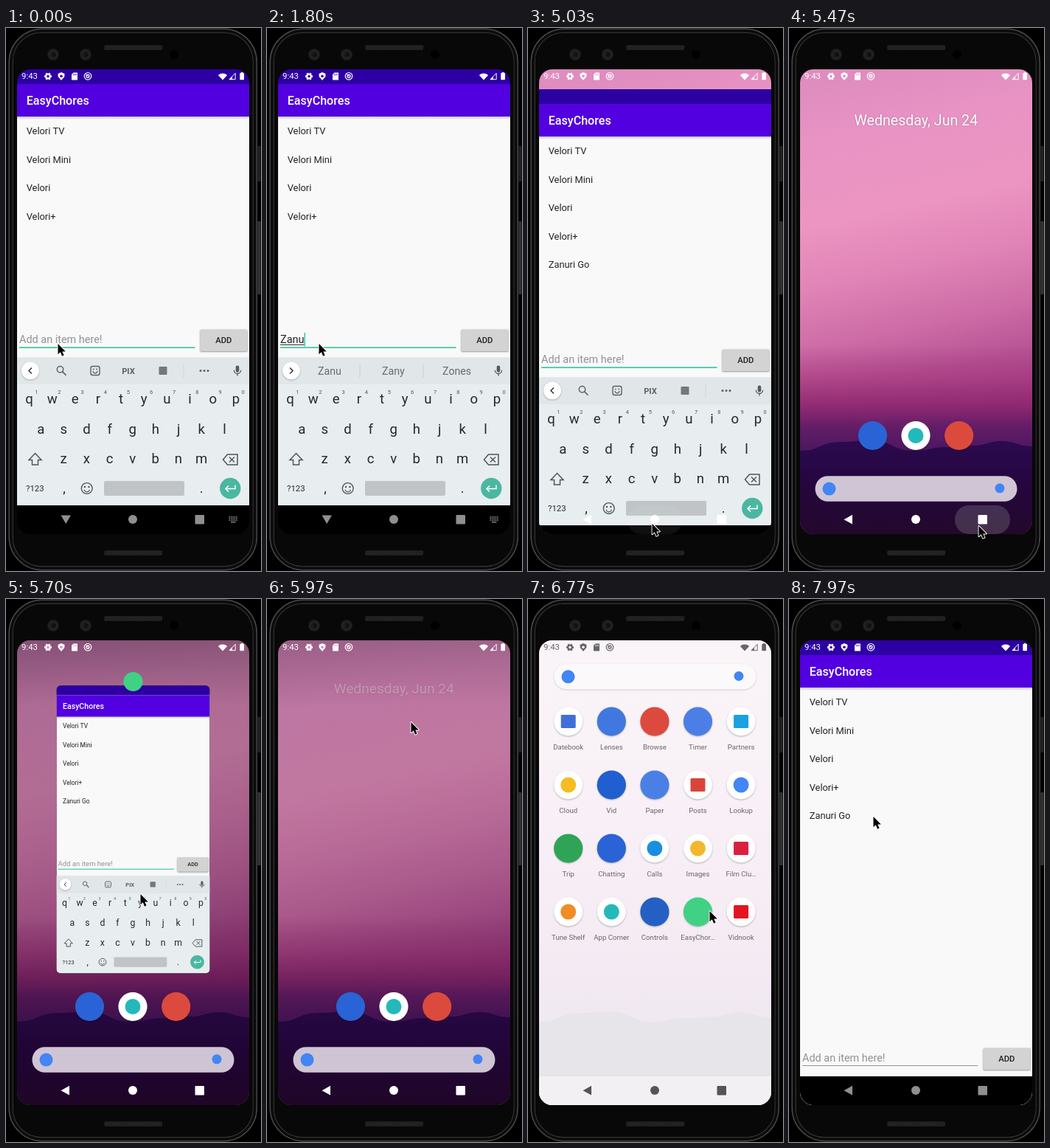
Animation, 346 px wide and 736 px high, one loop 8000 ms. Source, as an HTML page with a canvas:

```html
<!DOCTYPE html>
<html lang="en">
<head>
<meta charset="utf-8">
<title>Chore list</title>
<style>
html, body { margin: 0; width: 100%; height: 100%; overflow: hidden; background: #000; }
canvas { display: block; width: 346px; height: 736px; }
</style>
</head>
<body>
<canvas id="stage"></canvas>
<script>
const W = 346, H = 736, LOOP = 8000;
const canvas = document.getElementById('stage');
const dpr = window.devicePixelRatio || 1;
canvas.width = W * dpr;
canvas.height = H * dpr;
const c = canvas.getContext('2d');

const SCREEN = { x: 15, y: 56, w: 315, h: 630, r: 18 };
const TEAL = '#35c9a5', BLUE = '#2a63d6';
const ITEMS = ['Velori TV', 'Velori Mini', 'Velori', 'Velori+', 'Zanuri Go'];
const APP = 'EasyChores';

const KEY_TIMES = [450, 1050, 1450, 1800, 2050, 2250, 2600, 2850, 3150];
const ADD = 4050;
const HINTS = [
  ['Z', 'Zoo', 'Zone'], ['Za', 'Zap', 'Zone'], ['Zan', 'Zany', 'Zone'],
  ['Zanu', 'Zany', 'Zones'], ['Zanur', 'Zany', 'Zones'], ['Zanuri', 'Zany', 'Zones'],
  ['is', 'and', 'the'], ['G', 'Get', 'Give'], ['Go', 'Good', 'Going']
];

// time, x, y of the pointer tip
const POINTER = [
  [0, 70, 428], [3450, 70, 428], [3850, 291, 418], [4180, 291, 418],
  [4600, 205, 724], [4930, 168, 672], [5080, 168, 672], [5350, 257, 675],
  [5570, 257, 675], [5690, 182, 400], [5740, 182, 400], [5880, 194, 175],
  [5970, 195, 167], [6080, 195, 170], [6240, 200, 520], [6440, 206, 250],
  [6700, 246, 423], [7420, 246, 423], [7800, 114, 295], [8000, 114, 295]
];

const clamp = v => Math.max(0, Math.min(1, v));
const ramp = (t, a, b) => clamp((t - a) / (b - a));
const ease = p => p * p * (3 - 2 * p);
const out = p => 1 - (1 - p) ** 3;
const mix = (a, b, p) => a + (b - a) * p;

function rect(x, y, w, h, color) { c.fillStyle = color; c.fillRect(x, y, w, h); }

function round(x, y, w, h, r, color) {
  c.beginPath(); c.roundRect(x, y, w, h, r);
  c.fillStyle = color; c.fill();
}

function disc(x, y, r, color) {
  c.beginPath(); c.arc(x, y, r, 0, 7);
  c.fillStyle = color; c.fill();
}

function trace(points, close) {
  c.beginPath();
  for (let i = 0; i < points.length; i += 2) c.lineTo(points[i], points[i + 1]);
  if (close) c.closePath();
}

function poly(points, color) { trace(points, true); c.fillStyle = color; c.fill(); }

function line(points, color, width = 1, close = false) {
  trace(points, close);
  c.strokeStyle = color; c.lineWidth = width; c.stroke();
}

function ring(x, y, r, color, width = 1, a = 0, b = 7) {
  c.beginPath(); c.arc(x, y, r, a, b);
  c.strokeStyle = color; c.lineWidth = width; c.stroke();
}

function box(x, y, w, h, r, color, width = 1) {
  c.beginPath(); c.roundRect(x, y, w, h, r);
  c.strokeStyle = color; c.lineWidth = width; c.stroke();
}

function text(s, x, y, size, color, align = 'left', weight = 400) {
  c.font = `${weight} ${size}px Roboto, sans-serif`;
  c.textAlign = align;
  c.fillStyle = color;
  c.fillText(s, x, y);
}

function shadow(blur, dy, alpha, draw) {
  c.save();
  c.shadowColor = `rgba(0,0,0,${alpha})`;
  c.shadowBlur = blur * dpr; c.shadowOffsetY = dy * dpr;
  draw();
  c.restore();
}

function layer(alpha, draw) {
  if (alpha <= 0) return;
  c.save(); c.globalAlpha *= alpha; draw(); c.restore();
}

function gradient(x0, y0, x1, y1, stops) {
  const g = c.createLinearGradient(x0, y0, x1, y1);
  stops.forEach(([p, color]) => g.addColorStop(p, color));
  return g;
}

const vertical = (y0, y1, stops) => gradient(0, y0, 0, y1, stops);

function body() {
  rect(0, 0, W, H, '#000');
  round(340, 160, 5.5, 48, 1, '#222');
  round(340, 262, 5.5, 99, 1, '#333');
  round(3, .5, 338.5, 735, 46, '#0a0a0a');
  box(4.2, 1.2, 336, 733.5, 45, '#484848', 1.5);
  box(6.8, 3.8, 330.8, 728.4, 42, '#0c0c0c', 3);
  box(9.3, 6.3, 325.8, 723.4, 39, '#343434', 1.2);
  round(10, 7, 324.4, 722, 38, '#080808');
  for (const y of [23, 708]) {
    round(133, y, 79, 7, 2, '#1d1d1d');
    for (let x = 135; x < 211; x += 3) line([x, y + 6, x + 2, y + 1], '#303030', .8);
  }
  for (const x of [64, 108]) {
    disc(x, 36, 8, '#1b1b1b');
    ring(x, 36, 5.5, '#2b2b2b');
    disc(x + 1, 36, 2.5, '#101010');
  }
  disc(228, 36, 6, '#000');
}

function gear(x, y, color) {
  for (let i = 0; i < 6; i++) {
    const a = i * Math.PI / 3;
    line([x, y, x + 5 * Math.cos(a), y + 5 * Math.sin(a)], color, 2.4);
  }
  disc(x, y, 3.9, color);
}

function statusIcons(color, hole) {
  text('9:43', 21, 69.4, 11.4, color);
  gear(57, 65.5, color);
  disc(57, 65.5, 1.7, hole);
  poly([75, 60, 79.5, 62, 79.3, 66, 75, 71, 70.7, 66, 70.5, 62], color);
  disc(75, 65.3, 1.8, hole);
  poly([91.5, 60.5, 97, 60.5, 97, 70.5, 89, 70.5, 89, 63], color);
  for (const x of [91.5, 93.5, 95.3]) rect(x - .4, 62, .8, 2.3, hole);
  ring(111, 65.3, 4.8, color, 1.2);
  ring(111, 65.3, 2.1, color, 1.2);
  line([108.2, 62.2, 112.5, 66.8], color);
  c.beginPath(); c.moveTo(294, 70.5); c.arc(294, 70.5, 9, -2.32, -.82);
  c.fillStyle = color; c.fill();
  line([303, 69.7, 311.2, 61.3, 311.2, 69.7], color, 1, true);
  poly([303, 69.7, 307, 65.6, 307, 69.7], color);
  round(317.3, 61, 5.7, 9.2, .8, color);
  rect(318.8, 60, 2.7, 1.2, color);
}

function navIcons(color, keys) {
  if (keys) poly([74.5, 660.5, 88, 660.5, 81.2, 672], color);
  else poly([86, 659.8, 86, 672.6, 74.5, 666.2], color);
  disc(172, 666, 6, color);
  round(256.5, 660, 12.5, 12.5, 1, color);
  if (keys) {
    for (let r = 0; r < 3; r++)
      for (let i = 0; i < 5; i++) rect(302.5 + i * 2.4, 662 + r * 2.3, 1.5, 1.4, color);
    rect(305, 669, 6.5, 1.3, color);
  }
}

function mic(x, y) {
  round(x - 2.3, y - 7, 4.6, 9, 2.3, '#555b60');
  ring(x, y - .8, 4.7, '#555b60', 1.3, 0, Math.PI);
  line([x, y + 4, x, y + 7], '#555b60', 1.4);
}

function toolbar(words) {
  const g = '#5b6166', y = 464.5;
  rect(15, 447, 315, 36, '#e1e6e9');
  shadow(2, .7, .3, () => disc(33, y, 12, '#fff'));
  const d = words ? 2 : -2;
  line([33 - d, y - 4, 33 + d, y, 33 - d, y + 4], '#333', 1.5);
  mic(314, y);
  if (words) {
    words.forEach((s, i) => text(s, 85 + i * 86.3, 470, 14.2, '#666c71', 'center'));
    for (const x of [126, 212]) rect(x - .5, 456, 1, 18, '#c9ced2');
    return;
  }
  ring(73.5, 462.7, 4.2, g, 1.5);
  line([76.6, 465.8, 81.5, 470.7], g, 1.7);
  box(115, 458.5, 12, 12, 2.5, g, 1.4);
  ring(121, 465, 2.8, g, 1.2, 0, Math.PI);
  disc(118.8, 462.5, .9, g);
  disc(123.2, 462.5, .9, g);
  text('PIX', 166, 468.5, 11.2, g, 'center', 700);
  round(207.5, 459, 11, 11, 1, '#72787c');
  rect(240.5, 456, 1, 18, '#d2d7da');
  for (const x of [264, 269, 274]) disc(x, y, 1.5, g);
}

function keyboard(words) {
  const ink = '#26292c', g = '#50565a';
  rect(15, 446, 315, 201, '#e8edf0');
  toolbar(words);
  const row = (s, x, y) => [...s].forEach((k, i) => text(k, x + i * 31.15, y, 18.6, ink, 'center'));
  row('qwertyuiop', 31.5, 509);
  row('asdfghjkl', 47.2, 549.5);
  row('zxcvbnm', 78.2, 590);
  [...'1234567890'].forEach((k, i) => text(k, 41.3 + i * 31.15, 496.3, 7.5, g, 'center'));
  line([39.5, 576.5, 48, 585.5, 43.5, 585.5, 43.5, 592, 35.5, 592, 35.5, 585.5, 31, 585.5], g, 1.5, true);
  line([294.5, 585, 300.5, 578, 314, 578, 314, 592, 300.5, 592], g, 1.5, true);
  line([303, 581.5, 310, 588.5], g, 1.5);
  line([310, 581.5, 303, 588.5], g, 1.5);
  text('?123', 39.3, 628, 11.4, ink, 'center');
  text(',', 79, 629.5, 18, ink, 'center');
  text('.', 265, 629.5, 18, ink, 'center');
  ring(109.7, 624, 7.4, g, 1.4);
  ring(109.7, 625, 3.8, g, 1.3, .2, 2.94);
  disc(107, 622, 1.2, g);
  disc(112.4, 622, 1.2, g);
  round(133, 614, 109, 20, 2, '#c0c4c7');
  disc(304.3, 624, 14.2, '#4bb7a1');
  line([311, 619.5, 311, 624.5, 298, 624.5], '#fff', 1.5);
  line([302, 620.5, 298, 624.5, 302, 628.5], '#fff', 1.5);
}

function appWindow(o) {
  const dy = o.keys ? 0 : 200;
  rect(15, 56, 315, 630, '#000');
  rect(15, 75, 315, 572, '#f9f9f9');
  rect(15, 56, 315, 20, '#2d00a3');
  rect(15, 120, 315, 4, vertical(120, 124, [[0, 'rgba(0,0,0,.2)'], [1, 'rgba(0,0,0,0)']]));
  rect(15, 76, 315, 44, '#5200e0');
  if (o.blank) return;
  text(APP, 27.7, 104, 16.1, '#fff', 'left', 500);
  ITEMS.slice(0, o.count).forEach((s, i) => text(s, 27.7, 144 + i * 38.5, 12.85, '#222'));

  const typed = o.typed || '';
  text(typed || 'Add an item here!', 18, 427 + dy, 14.45, typed ? '#222' : '#929292');
  const end = 18 + (typed ? c.measureText(typed).width : 0);
  if (typed && !typed.endsWith(' ')) {
    const start = 18 + c.measureText(typed.slice(0, typed.lastIndexOf(' ') + 1)).width;
    rect(start, 428.8 + dy, end - start, 1, '#222');
  }
  if (o.caret) rect(end, 413, 1.5, 18.5, TEAL);
  if (o.keys) rect(18, 432.3, 238.5, 1.7, TEAL);
  else rect(18, 632, 238.5, 1, '#929292');

  shadow(2, 1, .4, () => round(263.5, 408.5 + dy, 64, 29.5, 1.6, o.pressed ? '#b8b8b8' : '#d3d3d3'));
  text('ADD', 295.3, 427 + dy, 11.3, '#222', 'center', 500);
  if (o.keys) keyboard(o.words);
}

function ridge(points, color) {
  c.beginPath(); c.moveTo(15, 686); c.lineTo(15, points[1]);
  for (let i = 2; i < points.length; i += 2) {
    const mx = (points[i - 2] + points[i]) / 2;
    c.bezierCurveTo(mx, points[i - 1], mx, points[i + 1], points[i], points[i + 1]);
  }
  c.lineTo(330, 686);
  c.fillStyle = color; c.fill();
}

const RIDGE = [15, 573, 70, 561, 112, 559, 168, 573, 215, 568, 250, 566, 288, 560, 330, 567];

// Tilted pink sky, a level dusk haze above the hills, then the hills.
function wallpaper() {
  rect(15, 56, 315, 630, gradient(120, 60, 225, 530, [
    [0, '#df8cbf'], [.15, '#e893c4'], [.38, '#ec95c2'], [.55, '#e184b7'],
    [.72, '#cd6ca6'], [.86, '#b65394'], [1, '#a24186']
  ]));
  rect(15, 430, 315, 150, vertical(430, 575, [
    [0, 'rgba(160,50,120,0)'], [.3, 'rgba(160,45,118,.45)'], [.58, 'rgba(135,35,108,.85)'],
    [.75, 'rgba(98,27,102,.95)'], [1, '#4a165f']
  ]));
  ridge(RIDGE, vertical(558, 686, [[0, '#2c0a4f'], [.45, '#25063f'], [1, '#23082c']]));
}

function appIcon(x, y, base, mark, square) {
  shadow(2, 1, .28, () => disc(x, y, 19.6, base));
  if (!mark) return;
  if (square) round(x - 10, y - 9, 20, 18, 1.5, mark);
  else disc(x, y, 10.5, mark);
}

function searchBar(y, color, soft) {
  shadow(2, .8, soft, () => round(35.5, y, 274, 34.5, 17.2, color));
  disc(54.5, y + 17.3, 9, '#4285f4');
  disc(286, y + 16.5, 6.5, '#4285f4');
}

function dock() {
  appIcon(113.5, 552.5, BLUE);
  appIcon(172, 552.5, '#fff', '#23b9ba');
  appIcon(230.7, 552.5, '#dc4a3e');
  searchBar(607.3, 'rgba(226,218,230,.9)', 0);
}

function home(dateAlpha, scrim, dockAlpha) {
  wallpaper();
  if (scrim > 0) {
    rect(15, 56, 315, 630, `rgba(20,0,25,${scrim * .27})`);
    rect(15, 56, 315, 90, vertical(56, 146, [[0, `rgba(40,20,40,${scrim * .25})`], [1, 'rgba(40,20,40,0)']]));
  }
  layer(dateAlpha, () => {
    const s = mix(.96, 1, dateAlpha);
    c.translate(172.3, mix(120, 124.5, dateAlpha));
    c.scale(s, s);
    shadow(2, .5, .3, () => text('Wednesday, Jun 24', 0, 7, 19.6, '#fff', 'center'));
  });
  layer(dockAlpha, dock);
}

const W0 = '#fff';
const APPS = [
  ['Datebook', W0, '#3f6fd9', 1], ['Lenses', '#4178df'], ['Browse', '#dc4a3e'], ['Timer', '#4b7fe6'], ['Partners', W0, '#1ba0e0', 1],
  ['Cloud', W0, '#f5bd23'], ['Vid', '#1f5fd0'], ['Paper', '#4a80e6'], ['Posts', W0, '#d8443a', 1], ['Lookup', W0, '#4285f4'],
  ['Trip', '#2fa456'], ['Chatting', BLUE], ['Calls', W0, '#1a8fe0'], ['Images', W0, '#f2b72c'], ['Film Clu…', W0, '#d9213e', 1],
  ['Tune Shelf', W0, '#f28b24'], ['App Corner', W0, '#23b9ba'], ['Controls', '#2460c4'], ['EasyChor…', '#41d184'], ['Vidnook', W0, '#e3151f', 1]
];

function drawer(p) {
  layer(clamp(p * 1.4), () => {
    rect(15, 56, 315, 630, vertical(56, 686, [[0, '#faf5f8'], [.45, '#f8eff6'], [.75, '#f2e9f2'], [1, '#ebe8ed']]));
    ridge(RIDGE, '#e8e5ea');
    rect(15, 647, 315, 39, '#f2f0f3');
  });
  layer(clamp(p * 1.6 - .2), () => {
    c.translate(0, (1 - p) * 519);
    searchBar(88, '#fcf9fb', .2);
    APPS.forEach(([name, ...icon], i) => {
      const x = 54.7 + i % 5 * 58.6, y = 166 + Math.floor(i / 5) * 86;
      appIcon(x, y, ...icon);
      text(name, x, y + 38.2, 9.65, '#696669', 'center');
    });
  });
}

function ripple(x, alpha) {
  layer(alpha, () => round(x - 37.5, 647, 75, 39, 19, 'rgba(225,240,225,.17)'));
}

function editing(t) {
  const n = KEY_TIMES.filter(k => k <= t).length;
  const added = t >= ADD;
  const last = added ? ADD : n ? KEY_TIMES[n - 1] : -500;
  const busy = n && !added && t < 3450;
  appWindow({
    keys: true,
    count: added ? 5 : 4,
    typed: added ? '' : ITEMS[4].slice(0, n),
    words: !added && n ? HINTS[n - 1] : null,
    caret: busy || (t - last) % 1000 < 500 && t >= 500,
    pressed: t > 3980 && t < 4130
  });
}

// The task card shrinks from the full window, then is flung upward.
function taskCard(t) {
  const p = out(ramp(t, 5560, 5650)), lift = ramp(t, 5740, 5880);
  layer(p * (1 - ramp(lift, .6, 1)), () => {
    const s = mix(.8, .66, p);
    c.translate(172.5, 312 - 430 * lift * lift);
    c.scale(s, s);
    c.translate(-172.5, -351);
    c.beginPath(); c.roundRect(15, 56, 315, 591, 9); c.clip();
    appWindow({ keys: true, count: 5 });
  });
  layer(p * (1 - lift), () => disc(172.5, 112 - 430 * lift * lift, 13, '#41d184'));
}

function launch(t) {
  const p = ease(ramp(t, 7200, 7430));
  if (p <= 0) return;
  const x = mix(211, 15, p), y = mix(404.5, 56, p), w = mix(39, 315, p), h = mix(39, 630, p);
  layer(clamp(p * 5), () => {
    c.beginPath(); c.roundRect(x, y, w, h, mix(19, 0, p)); c.clip();
    c.translate(x, y);
    c.scale(w / 315, w / 315);
    c.translate(-15, -56);
    appWindow({ keys: false, count: 5, blank: t < 7550 });
  });
}

function screen(t) {
  if (t < 4985) {
    editing(t);
    statusIcons('#fff', '#2d00a3');
    navIcons('#8f8f8f', true);
    ripple(172, ramp(t, 4940, 4970));
    return;
  }
  if (t < 6950) {
    const over = ramp(t, 5560, 5640) * (1 - ramp(t, 5920, 6110));
    const p = ease(ramp(t, 6250, 6580));
    const rest = 1 - clamp(p * 3);
    const covered = t > 5600 && t < 5890;
    home(covered ? 0 : (1 - over * .97) * rest, over, rest);
    if (t < 5180) {
      layer(1 - ramp(t, 5040, 5165), () => {
        c.translate(0, 92 * out(ramp(t, 4985, 5405)));
        editing(t);
      });
    }
    if (t > 5560 && t < 5890) taskCard(t);
    if (p > 0) drawer(p);
    ripple(172, 1 - ramp(t, 4985, 5060));
    ripple(262.5, ramp(t, 5400, 5440) * (1 - ramp(t, 5560, 5680)));
    statusIcons(p > .8 ? '#666' : '#fff', p > .8 ? '#faf5f8' : '#db8dbb');
    navIcons(p > .8 ? '#555' : '#fff', false);
    return;
  }
  drawer(1);
  launch(t);
  const open = t > 7380;
  statusIcons(open ? '#fff' : '#666', open ? '#2d00a3' : '#faf5f8');
  navIcons(open ? '#8f8f8f' : '#555', false);
}

function pointer(t) {
  const i = POINTER.findIndex((k, n) => n && t <= k[0]);
  const [t0, x0, y0] = POINTER[i - 1], [t1, x1, y1] = POINTER[i];
  const p = ease(ramp(t, t0, t1));
  c.save();
  c.translate(mix(x0, x1, p), mix(y0, y1, p));
  const arrow = [.5, 0, .5, 14.3, 3.8, 11.3, 6.1, 16.7, 8.6, 15.6, 6.3, 10.5, 10.8, 10.5];
  c.lineJoin = 'round';
  line(arrow, '#fff', 1.8, true);
  poly(arrow, '#000');
  c.restore();
}

function frame(now) {
  const t = now % LOOP;
  c.setTransform(dpr, 0, 0, dpr, 0, 0);
  body();
  c.save();
  c.beginPath();
  c.roundRect(SCREEN.x, SCREEN.y, SCREEN.w, SCREEN.h, SCREEN.r);
  c.clip();
  screen(t);
  c.restore();
  pointer(t);
}

const began = performance.now();
function tick() {
  frame(performance.now() - began);
  requestAnimationFrame(tick);
}
tick();
</script>
</body>
</html>
```
